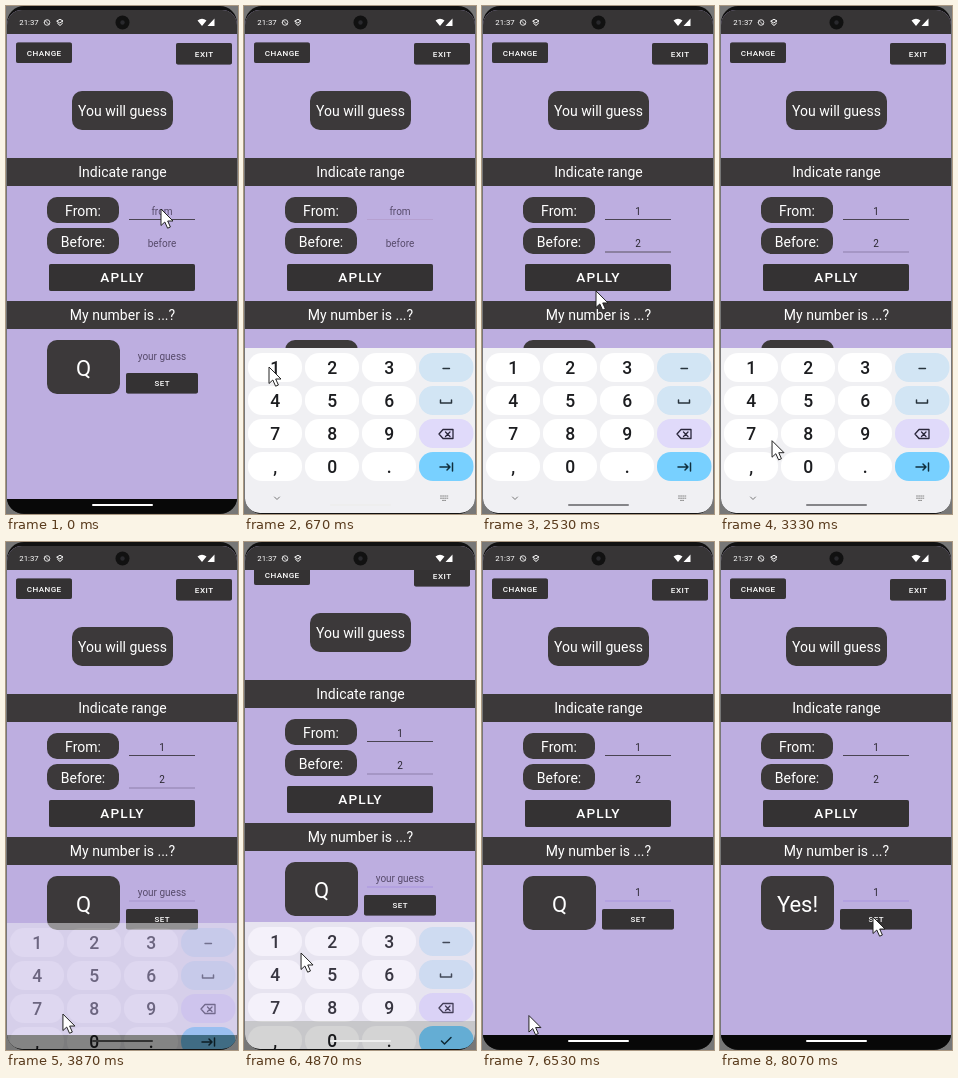
Animation, 232 px wide and 508 px high, one loop 8390 ms. Source, as an HTML page:

```html
<!DOCTYPE html>
<html lang="en">
<head>
<meta charset="utf-8">
<title>Guess the number</title>
<style>
html, body { margin: 0; width: 100%; height: 100%; overflow: hidden; background: #777; }
svg { display: block; width: 232px; height: 508px; }
text { font-family: Roboto, Arial, sans-serif; text-anchor: middle; }
.btn { filter: drop-shadow(0 .5px .7px rgba(0, 0, 0, .35)); }
.icon { fill: none; stroke-linecap: round; stroke-linejoin: round; }
</style>
</head>
<body>
<svg id="stage" viewBox="0 0 232 508">
  <clipPath id="screen"><rect x="1" y="4" width="230" height="503" rx="15"/></clipPath>
  <rect x="1" width="230" height="508" rx="17" fill="#111"/>
  <g clip-path="url(#screen)">
    <rect width="232" height="508" fill="#080808"/>
    <g id="page"></g>
    <g id="status"></g>
    <g id="keyboard"></g>
    <rect id="pill" x="86" y="498" width="61" height="2" rx="1"/>
  </g>
  <path id="cursor" d="M0 0V16.5L3.8 13L6.6 19.2L9.4 18L6.7 12H12Z" fill="#fff" stroke="#222" stroke-width="1" stroke-linejoin="round"/>
</svg>
<script>
const $ = id => document.getElementById(id);
const DARK = '#3c393a', BUTTON = '#343233', HINT = '#574b6b', INK = '#2a2730';

const box = (x, y, w, h, r, fill, extra = '') =>
  `<rect x="${x}" y="${y}" width="${w}" height="${h}" rx="${r}" fill="${fill}" ${extra}/>`;
const label = (s, x, y, size, fill = '#fff', extra = '') =>
  `<text x="${x}" y="${y + size * .355}" font-size="${size}" fill="${fill}" ${extra}>${s}</text>`;
const icon = (d, color, width = 1) =>
  `<path class="icon" d="${d}" stroke="${color}" stroke-width="${width}"/>`;
const button = (s, x, y, w, h, size, gap) =>
  box(x, y, w, h, 2, BUTTON, 'class="btn"') +
  label(s, x + w / 2 + gap / 2, y + h / 2, size, '#fff', `font-weight="500" letter-spacing="${gap}"`);
const card = (s, x, y, w, h, size, id = '') =>
  box(x, y, w, h, 10, DARK) + label(s, x + w / 2, y + h / 2 + 1, size, '#fff', id);
const bar = (s, y) => box(0, y, 232, 28, 0, DARK) + label(s, 116.5, y + 14.5, 14);
const field = (id, y) =>
  label('', 156, y, 10, HINT, `id="${id}"`) + box(123, y + 8, 66, 1, 0, 'none', `id="${id}Line"`);

$('page').innerHTML =
  box(0, 0, 232, 493, 0, '#bdaee0') +
  button('CHANGE', 10, 36.5, 56, 20.5, 8.1, .4) +
  button('EXIT', 170, 37, 56, 21.5, 8.1, .5) +
  card('You will guess', 66, 85, 101, 39, 14) +
  bar('Indicate range', 152) +
  card('From:', 41, 191, 72, 26, 14) + field('from', 205) +
  card('Before:', 41, 222, 72, 26, 14) + field('before', 237.5) +
  button('APLLY', 43, 258, 146, 27, 13.6, 1.1) +
  bar('My number is ...?', 295) +
  card('', 41, 334, 73, 54, 22, 'id="answer"') + field('guess', 350.5) +
  button('SET', 120, 367, 72, 20.5, 7.9, .5);

$('status').innerHTML =
  box(0, 0, 232, 28, 0, '#373536') +
  label('21:37', 23, 16.5, 7.8) +
  icon('M38.2 16.5a2.8 2.8 0 1 0 5.6 0a2.8 2.8 0 1 0-5.6 0M39 14.5L43 18.5', '#fff', .8) +
  icon('M51 15L54 13.3L57 15L54 16.7ZM51.5 17.2L54 19.5L56.5 17.2', '#fff', 1) +
  '<path d="M191.5 14.5Q196 11 200.5 14.5L196 20ZM208.5 12.5V20H201.5Z" fill="#fff"/>' +
  '<circle cx="116.5" cy="16.5" r="7" fill="#111"/><circle cx="116.5" cy="16.5" r="2.2" fill="#29292d"/>';

const sideColors = ['#d2e5f4', '#d2e5f4', '#e0dafa', '#78d0ff'];
let keys = box(0, 342, 232, 360, 0, '#f0f0f3');
['1', '2', '3', '4', '5', '6', '7', '8', '9', ',', '0', '.'].forEach((s, i) => {
  const x = 4 + i % 3 * 57, y = 347 + Math.floor(i / 3) * 33;
  keys += box(x, y, 54, 29, 14, '#fff') +
    label(s, x + 27.3, y + 15, 17.5, '#1c1d20', 'font-weight="500"');
});
sideColors.forEach((color, i) => keys += box(175, 347 + i * 33, 54.5, 29, 14, color));
$('keyboard').innerHTML = keys +
  icon('M199 362.5H205.5', '#28343d', 1.4) +
  icon('M196.5 394V397H207.5V394', '#28343d', 1.5) +
  icon('M195 428L199 423.5H209V432.5H199ZM201.5 426L206 430.5M206 426L201.5 430.5', '#29263a', 1.3) +
  '<g id="tab">' + icon('M196 461H206M203 458L206 461L203 464M208.5 457V465', '#10303f', 1.5) + '</g>' +
  '<g id="check">' + icon('M197.5 461L200.5 464L207 457.5', '#10303f', 1.5) + '</g>' +
  icon('M30.5 491L33 493.5L35.5 491', '#777', 1) +
  icon('M196.5 490H204M196.5 492.2H204M198.5 494.4H202', '#888', 1).replace('/>', ' stroke-dasharray="1 1.1"/>');

// Pointer path: time, x, y
const path = [
  [0, 155, 203], [150, 155, 203], [620, 25, 361], [850, 25, 361],
  [1300, 150, 236], [1450, 150, 236], [1900, 82, 361], [2080, 82, 361],
  [2533, 114, 285], [2700, 115, 271], [2900, 115, 271], [3550, 30, 492],
  [3720, 30, 492], [3867, 57, 472], [4300, 152, 350], [4420, 152, 350],
  [4867, 57, 411], [5080, 28, 364], [5350, 28, 364], [5930, 26, 493],
  [6250, 26, 493], [7350, 153, 375], [8390, 153, 375]
];

const slope = (i, axis) => path[i] && path[i + 1]
  ? (path[i + 1][axis] - path[i][axis]) / (path[i + 1][0] - path[i][0]) : 0;

// Harmonic-mean tangents keep the spline smooth and free of overshoot
function tangent(i, axis) {
  const a = slope(i - 1, axis), b = slope(i, axis);
  return a * b > 0 ? 2 * a * b / (a + b) : 0;
}

function pointer(t, axis) {
  let i = 0;
  while (i < path.length - 2 && t >= path[i + 1][0]) i++;
  const p = path[i], q = path[i + 1], d = q[0] - p[0], u = (t - p[0]) / d, v = 1 - u;
  return p[axis] * v * v * (1 + 2 * u) + q[axis] * u * u * (3 - 2 * u) +
    d * u * v * (v * tangent(i, axis) - u * tangent(i + 1, axis));
}

const progress = (t, start, length) => Math.max(0, Math.min(1, (t - start) / length));

// Returns keyboard drop, opacity and page scroll
function slide(t) {
  const second = t >= 4300, shown = progress(t, second ? 4715 : 260, 300);
  const hidden = progress(t, second ? 6200 : 3767, 200), lift = second ? 22 : 0;
  if (hidden) return [156 * hidden ** 2, 1 - hidden, lift * (1 - hidden ** 2)];
  return [156 * (1 - shown) ** 2, 1 - (1 - shown) ** 2.5, lift * (1 - (1 - shown) ** 1.4)];
}

// The home pill darkens a little after the keyboard has opened
const pillDark = (t, alpha) => alpha > 0 && (t < 4300 ? t > 900 : t > 5150);

function setField(id, value, hint, line) {
  $(id).textContent = value || hint;
  $(id).setAttribute('fill', value ? INK : HINT);
  $(id + 'Line').setAttribute('fill', line);
}

function draw(t) {
  const [drop, alpha, scroll] = slide(t);
  $('page').setAttribute('transform', `translate(0 ${-Math.round(scroll)})`);
  $('keyboard').setAttribute('transform', `translate(0 ${Math.round(drop)})`);
  $('keyboard').setAttribute('opacity', alpha);
  $('pill').setAttribute('fill', !pillDark(t, alpha) ? alpha ? '#eee' : '#fff' : alpha < 1 ? '#333' : '#858588');
  const guessing = t >= 4420;
  $('tab').style.display = guessing ? 'none' : '';
  $('check').style.display = guessing ? '' : 'none';

  setField('from', t >= 780 ? '1' : '', 'from',
    t < 200 ? '#4a4452' : t < 900 ? '#b5a0d0' : scroll > 15 ? '#6b5f85' : '#4a4452');
  setField('before', t >= 2000 ? '2' : '', 'before',
    t < 1400 || t > 6500 ? 'none' : t < 2750 ? '#5a5463' : '#8d80ac');
  setField('guess', t >= 5200 ? '1' : '', 'your guess',
    t < 3000 ? 'none' : guessing ? '#a995e2' : '#a897cf');
  $('answer').textContent = t >= 7500 ? 'Yes!' : 'Q';
  $('cursor').setAttribute('transform', `translate(${pointer(t, 1)} ${pointer(t, 2)})`);
}

const LOOP = 8390, STEP = 200 / 3, LAST = 121;
const start = performance.now();
function tick() {
  const t = (performance.now() - start) % LOOP;
  draw(Math.min(LAST, Math.floor((t + 4) / STEP)) * STEP);
  requestAnimationFrame(tick);
}
tick();
</script>
</body>
</html>
```
